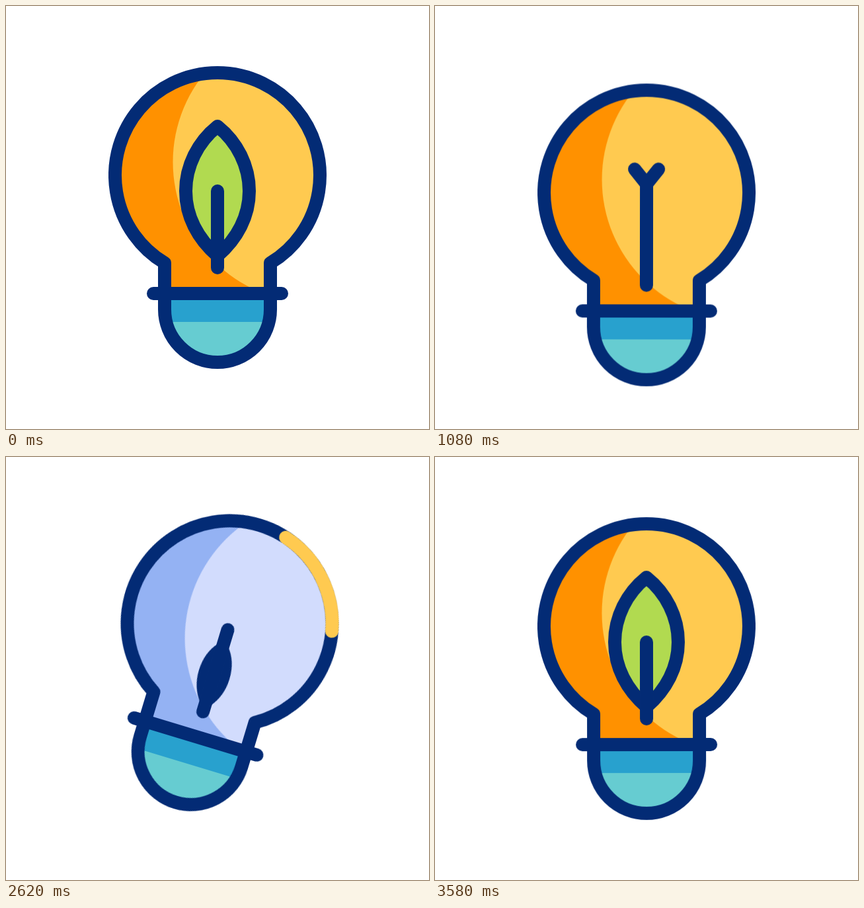
These frames come from a looping animation (640 px wide and 640 px high, 3600 ms). An HTML page without scripts:

```html
<!DOCTYPE html>
<html lang="en">
<head>
<meta charset="utf-8">
<title>Eco bulb</title>
<style>
  :root {
    --navy: #032b75; --yellow: #ffca50; --orange: #ff9100;
    --pale: #d2dcfd; --blue: #94b2f3;
    --sine: cubic-bezier(.37, 0, .63, 1);
  }
  html, body { margin: 0; width: 100%; height: 100%; overflow: hidden; background: #fff; }
  svg { display: block; width: 100%; height: 100%; }
  .line { fill: none; stroke: var(--navy); }
  .line, .leaf, .spark, .rays { stroke-width: 20; stroke-linecap: round; stroke-linejoin: round; }

  .bob, .tilt, .shade, .light, .leaf, .stem, .arms, .spark, .rays {
    animation: 3.6s var(--sine) infinite;
  }
  .bob { animation-name: bob; }
  .tilt { animation-name: tilt; transform-origin: 320px 320px; }
  .shade { animation-name: shade; }
  .light { animation-name: light; }
  .leaf {
    fill: #b1da50; stroke: var(--navy); vector-effect: non-scaling-stroke;
    animation-name: leaf; transform-origin: 320px 378px;
  }
  .stem { stroke-dasharray: 153 400; animation-name: stem; }
  .arms { stroke-dasharray: 68 400; animation-name: arms; }
  .spark {
    fill: none; stroke: var(--yellow); stroke-dasharray: 166 2000;
    animation-name: spark; animation-timing-function: linear;
  }
  .rays { stroke: var(--yellow); stroke-dasharray: 45 400; animation-name: rays; }

  @keyframes bob {
    0%, 100% { transform: translateY(0); }
    17.7% { transform: translateY(65.5px); }
    37.2% { transform: translateY(10px); }
    46.7% { transform: translateY(15px); }
    65.4% { transform: translateY(-26px); }
    85.3% { transform: translateY(36px); }
  }
  @keyframes tilt {
    0%, 100% { transform: rotate(0deg); }
    18.3% { transform: rotate(-15deg); }
    41.7% { transform: rotate(15deg); }
    57.8% { transform: rotate(.5deg); }
    70.8% { transform: rotate(18.3deg); }
    85.6% { transform: rotate(-15deg); }
  }
  @keyframes shade {
    0%, 36%, 91%, 100% { fill: var(--orange); }
    44.5%, 88% { fill: var(--blue); }
  }
  @keyframes light {
    0%, 36%, 91%, 100% { fill: var(--yellow); }
    44.5%, 88% { fill: var(--pale); }
  }
  @keyframes leaf {
    0%, 13.9% { transform: scale(1, 1); }
    25% { transform: scale(0, .17); }
    66.7% { transform: scale(0, .17); animation-timing-function: linear; }
    87.5%, 100% { transform: scale(1, 1); }
  }
  @keyframes stem {
    0%, 75.6%, 100% { stroke-dashoffset: 37; }
    13.9% { stroke-dashoffset: 73; }
    26.7%, 68.9% { stroke-dashoffset: 0; }
  }
  @keyframes arms {
    0%, 26.7%, 68.9%, 100% { stroke-dashoffset: 70; }
    33.9%, 62.2% { stroke-dashoffset: 0; }
  }
  @keyframes spark {
    0%, 62.7% { stroke-dashoffset: 186; }
    89%, 100% { stroke-dashoffset: -920; }
  }
  @keyframes rays {
    0%, 89.2% { stroke-dashoffset: 47; }
    99%, 100% { stroke-dashoffset: -78; }
  }
</style>
</head>
<body>
<svg viewBox="0 0 640 640">
  <defs>
    <path id="glass" d="M400 435V388.8A155 155 0 1 0 240 388.8V435"/>
    <path id="cap" d="M240 435V459a80 80 0 0 0 160 0V435"/>
    <path id="ray" d="M200 0H275"/>
    <clipPath id="inside"><use href="#glass"/></clipPath>
  </defs>
  <g class="bob">
    <g class="tilt">
      <g class="rays" transform="translate(320 256)">
        <use href="#ray"/>
        <use href="#ray" transform="rotate(45)"/>
        <use href="#ray" transform="rotate(135)"/>
        <use href="#ray" transform="rotate(180)"/>
        <use href="#ray" transform="rotate(225)"/>
        <use href="#ray" transform="rotate(315)"/>
      </g>

      <use class="shade" href="#glass"/>
      <g clip-path="url(#inside)">
        <circle class="light" cx="465" cy="236" r="212.5"/>
      </g>
      <use href="#cap" fill="#66ccd1"/>
      <path d="M242 435H398V478H242Z" fill="#28a1ce"/>

      <path class="leaf" d="M320 182C350 206 368 242 368 280S350 352 320 378C290 352 272 318 272 280S290 206 320 182Z"/>
      <path class="line stem" d="M320 396V243"/>
      <path class="line arms" d="M320 243L277.5 190M320 243L362.5 190"/>

      <use class="line" href="#cap"/>
      <use class="line" href="#glass"/>
      <use class="spark" href="#glass"/>
      <path class="line" d="M223 435H417"/>
    </g>
  </g>
</svg>
</body>
</html>
```
